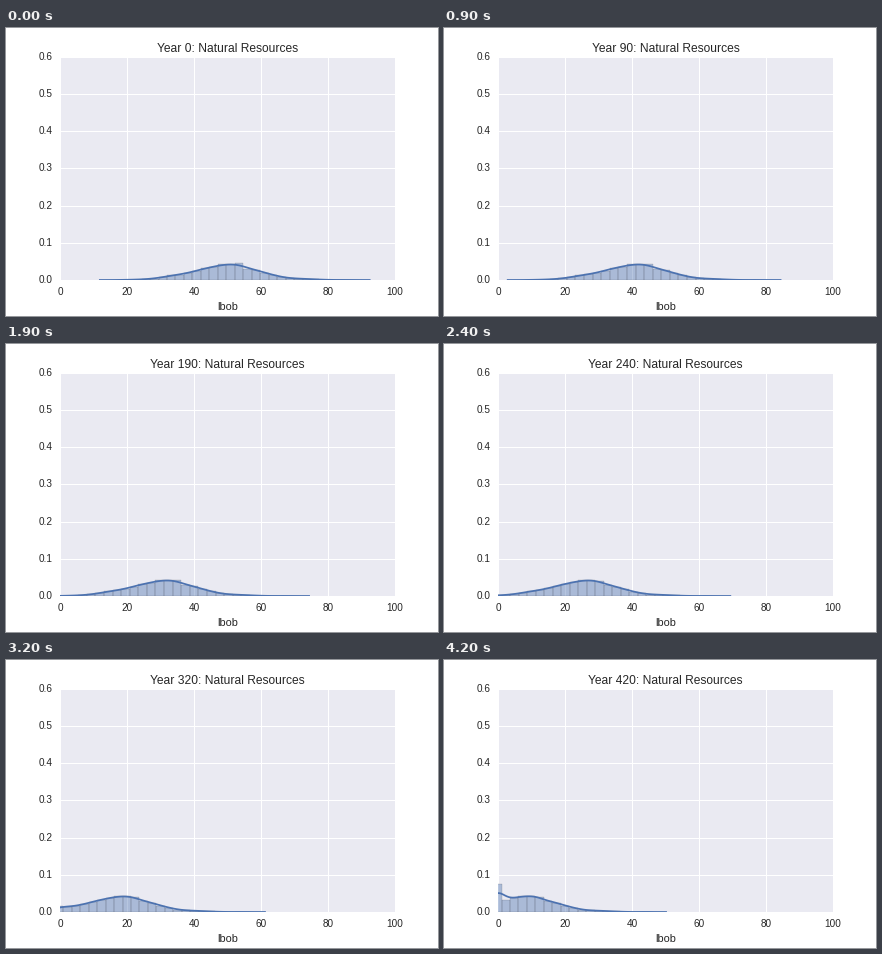
Recreate the animation shown at these times as a matplotlib script. Size 432x288 px, loop 4300 ms.

```python
import numpy as np
import matplotlib.pyplot as plt
from matplotlib.animation import FuncAnimation

FRAMES = 43
INTERVAL = 100
BLUE = "#4C72B0"
INK = "0.15"
LOW, HIGH = 19.3, 85.1
BIN_WIDTH = 2.57
COUNTS = [2, 3, 5, 10, 19, 32, 38, 49, 64, 84, 90, 110, 109,
          117, 77, 73, 51, 36, 20, 11, 10, 8, 4, 2, 0, 1]

plt.rcParams.update({
    "font.family": "Liberation Sans",
    "text.color": INK,
    "axes.labelcolor": INK,
    "xtick.color": INK,
    "ytick.color": INK,
})


def make_population():
    """Spread the agents evenly inside each starting bin."""
    edges = np.linspace(LOW, HIGH, len(COUNTS) + 1)
    parts = [np.linspace(a, b, n + 2)[1:-1]
             for a, b, n in zip(edges[:-1], edges[1:], COUNTS)]
    stock = np.concatenate(parts)
    stock[0], stock[-1] = LOW, HIGH
    return stock


START = make_population()
# Each agent stops losing resources at its own level just below zero.
FLOOR = -4 * (1 - (np.arange(len(START)) * 0.618034) % 1) ** 2.5


def stock_at(step):
    stock = START - step
    if step:
        stock[-1] += 0.9
    return np.maximum(stock, FLOOR)


def density(data):
    """Gaussian kernel estimate with Scott's bandwidth."""
    bw = data.std(ddof=1) * len(data) ** -0.2
    grid = np.linspace(data.min() - 3 * bw, data.max() + 3 * bw, 100)
    z = (grid[:, None] - data) / bw
    return grid, np.exp(-z * z / 2).mean(axis=1) / (bw * np.sqrt(2 * np.pi))


fig = plt.figure(figsize=(6, 4), dpi=72, facecolor="white")
ax = fig.add_axes([0.125, 0.125, 0.775, 0.775], facecolor="#EAEAF2")
ax.set(xlim=(0, 100), ylim=(0, 0.6))
ax.set_xticks(range(0, 101, 20))
ax.set_yticks(np.arange(7) / 10)
ax.set_axisbelow(True)
ax.grid(color="white", linewidth=1, linestyle="-")
ax.tick_params(length=0, pad=7, labelsize=10)
plt.setp(ax.get_yticklabels(), va="center")
for spine in ax.spines.values():
    spine.set_visible(False)
ax.set_xlabel("lbob", fontsize=11, labelpad=5)
title = ax.set_title("", fontsize=12, pad=5)
curve, = ax.plot([], [], color=BLUE, linewidth=1.75, zorder=3)
bars = []


def update(step):
    data = stock_at(step)
    for bar in bars:
        bar.remove()
    bins = round((data.max() - data.min()) / BIN_WIDTH)
    heights, edges = np.histogram(data, bins=bins, density=True)
    bars[:] = ax.bar(edges[:-1], heights, np.diff(edges), align="edge",
                     facecolor=BLUE, edgecolor="black", linewidth=0.3,
                     alpha=0.4, zorder=2)
    ax.set(xlim=(0, 100), ylim=(0, 0.6))
    curve.set_data(*density(data))
    title.set_text(f"Year {step * 10}: Natural Resources")
    return [*bars, curve, title]


anim = FuncAnimation(fig, update, frames=FRAMES, interval=INTERVAL,
                     init_func=lambda: update(0), repeat=True,
                     repeat_delay=0, blit=False)
plt.show()
```
